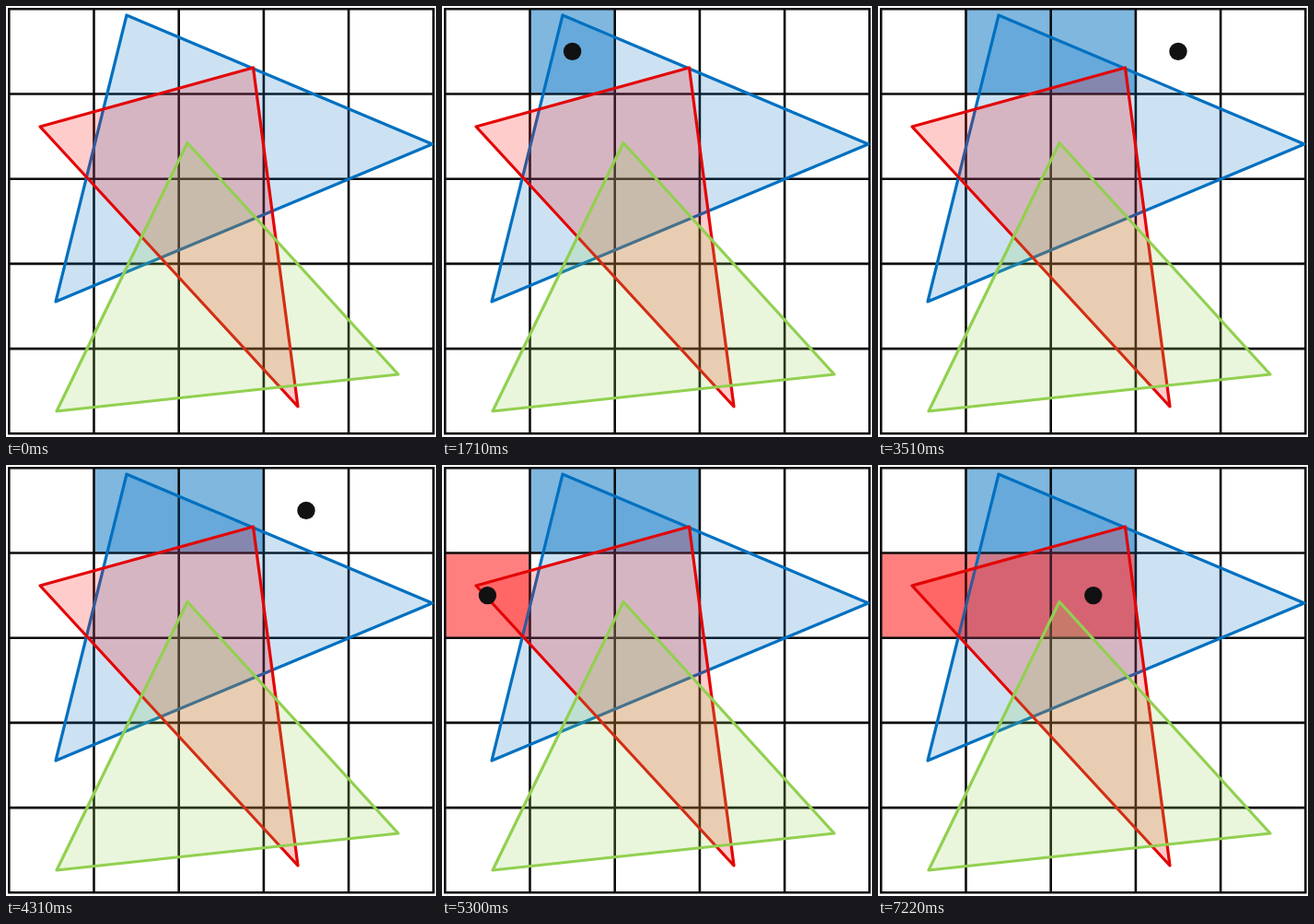
These frames come from a looping animation (467 by 468 pixels, 8000 ms). An HTML page:

```html
<!DOCTYPE html>
<html lang="en">
<head>
<meta charset="utf-8">
<title>Triangle rasterization</title>
<style>
  html, body { margin: 0; width: 100%; height: 100%; overflow: hidden; background: #fff; }
  svg { display: block; width: 100%; height: 100%; }
  .blue { fill: #0070c0; stroke: #0070c0; }
  .red { fill: #f00; stroke: #e30505; }
  .green { fill: #92d050; stroke: #92d050; }
  rect { fill-opacity: .5; stroke: none; }
  polygon { fill-opacity: .2; stroke-width: 3.2; stroke-linejoin: round; }
  #grid { fill: none; stroke: #0c0c0c; stroke-width: 2.6; }
  #dot { fill: #111; }
</style>
</head>
<body>
<svg viewBox="0 0 467 468">
  <g id="cells"></g>
  <path id="grid"/>
  <polygon class="blue" points="131,10 463,150 54,321"/>
  <polygon class="red" points="37,131 268.5,67 317,435"/>
  <polygon class="green" points="197,148.500 426,400 55,440"/>
  <circle id="dot" r="9.7"/>
</svg>
<script>
const LOOP = 8000, SIZE = 92.2, EDGE = 3.3, COUNT = 5;
const at = i => EDGE + i * SIZE;

// Each visited cell: start time, column, row and the colour it keeps.
const visits = [
  [660, 0, 0],
  [1580, 1, 0, 'blue'],
  [2510, 2, 0, 'blue'],
  [3440, 3, 0],
  [4370, 4, 0],
  [5300, 0, 1, 'red'],
  [6220, 1, 1, 'red'],
  [7160, 2, 1, 'red'],
];

const dot = document.getElementById('dot');
const cells = document.getElementById('cells');

let lines = '';
for (let i = 0; i <= COUNT; i++) {
  lines += `M${at(0) - 1.3} ${at(i)}H${at(COUNT) + 1.3}M${at(i)} ${at(0) - 1.3}V${at(COUNT) + 1.3}`;
}
document.getElementById('grid').setAttribute('d', lines);

function makeCell(col, row, color) {
  const cell = document.createElementNS('http://www.w3.org/2000/svg', 'rect');
  const attributes = { x: at(col), y: at(row), width: SIZE, height: SIZE, class: color };
  for (const name in attributes) cell.setAttribute(name, attributes[name]);
  return cells.appendChild(cell);
}

const shades = visits
  .filter(([, , , color]) => color)
  .map(([start, col, row, color]) => ({ start, cell: makeCell(col, row, color) }));

function draw() {
  const time = performance.now() % LOOP;
  const current = visits.filter(([start]) => start <= time).pop();
  for (const { start, cell } of shades) {
    cell.style.visibility = time >= start ? 'visible' : 'hidden';
  }
  dot.style.visibility = current ? 'visible' : 'hidden';
  if (current) {
    dot.setAttribute('cx', at(current[1] + .5));
    dot.setAttribute('cy', at(current[2] + .5));
  }
  requestAnimationFrame(draw);
}
draw();
</script>
</body>
</html>
```
